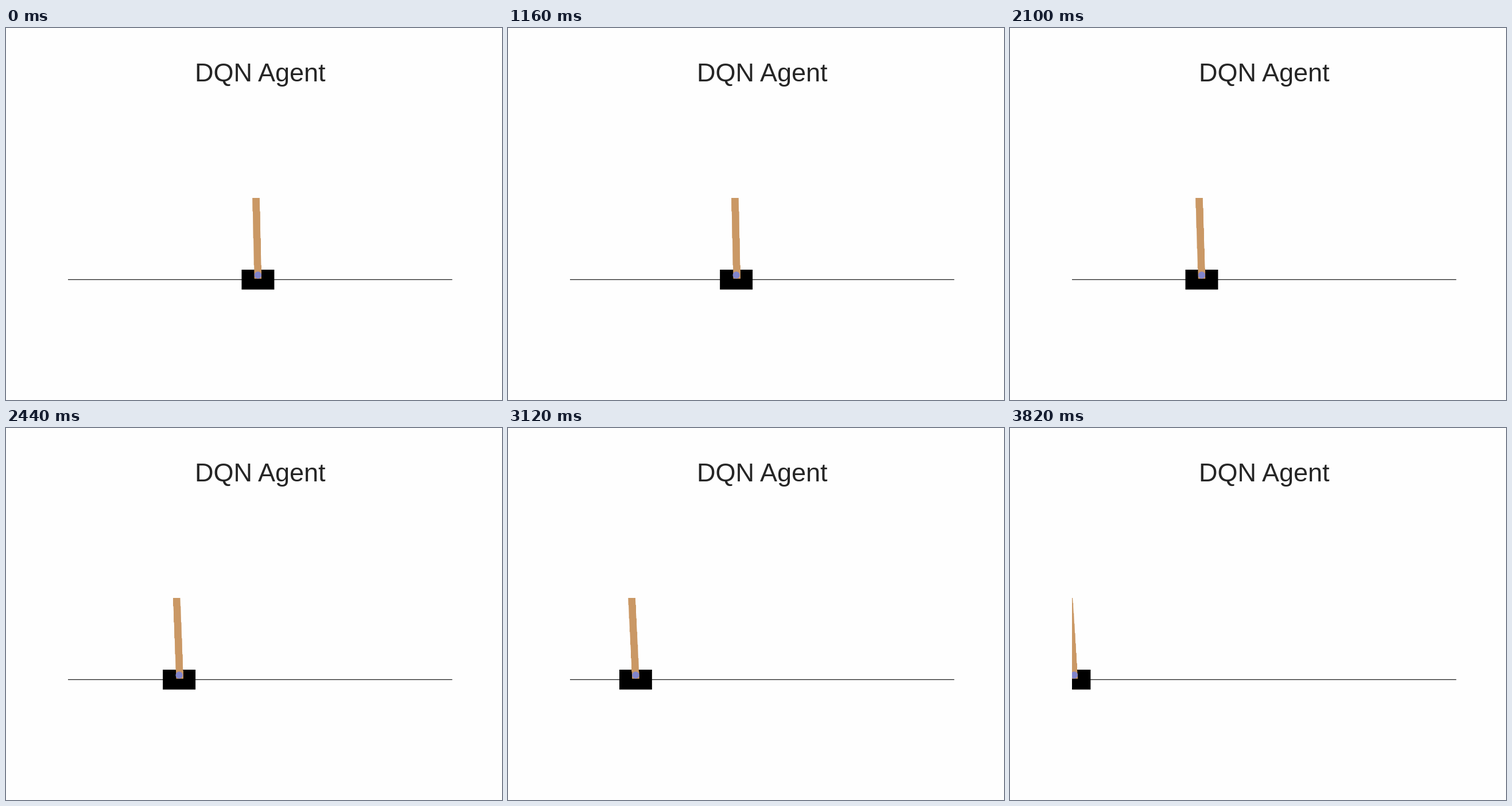
Animation, 864 px wide and 648 px high, one loop 3.84 s. Source, as an HTML page with a canvas:

```html
<!DOCTYPE html>
<html lang="en">
<head>
<meta charset="utf-8">
<title>Cart and pole</title>
<style>
  html, body { margin: 0; width: 100%; height: 100%; overflow: hidden; background: #fefefe; }
  canvas { display: block; }
</style>
</head>
<body>
<canvas id="stage" width="864" height="648"></canvas>
<script>
const ctx = document.getElementById('stage').getContext('2d');
const LOOP = 3840, STEP = 20;
const SCALE = 1.116, LEFT = 108, TOP = 104.04;   // plot area on the stage
const W = 600, H = 400, CART_Y = 100, PIVOT_Y = 107.5;
const POLE = 'rgb(202,152,101)', AXLE = 'rgb(129,132,203)';

// Leftward run of the cart: [ms, centre in plot pixels]
const run = [
  [0, 309], [560, 284.7], [1160, 259.95], [1640, 231.4],
  [2100, 202.3], [2760, 143.1], [3460, 59.4], [3820, 3.5]
];

// Smooth curve through unevenly spaced keys
function sample(keys, t) {
  const last = keys.length - 1;
  let i = 0;
  while (i < last - 1 && t >= keys[i + 1][0]) i++;
  const slope = k => {
    const a = keys[Math.max(k - 1, 0)], b = keys[Math.min(k + 1, last)];
    return (b[1] - a[1]) / (b[0] - a[0]);
  };
  const [t0, p0] = keys[i], [t1, p1] = keys[i + 1];
  const d = t1 - t0, u = (t - t0) / d, v = 1 - u;
  return v * v * (1 + 2 * u) * p0 + u * u * (3 - 2 * u) * p1
    + d * u * v * (v * slope(i) - u * slope(i + 1));
}

// The cart first drifts right, then joins the run
const cartX = t => sample(run, t) - 12.5 * Math.exp(-t / 114);

// Growing lean, a slow sway and a starting tilt, in radians
function poleAngle(t) {
  const s = t / 1000;
  return -0.0015 - 0.016 * s
    - 0.004 * Math.cos(2.62 * (s - 1.17))
    - 0.0285 * Math.exp(-((s / 0.22) ** 2));
}

const row = y => H - 1 - Math.floor(y);

function poleCorners(cx, angle) {
  const c = Math.cos(angle), s = Math.sin(angle);
  return [[-5, -5], [-5, 120], [5, 120], [5, -5]].map(([x, y]) =>
    [Math.floor(cx + x * c + y * s), row(PIVOT_Y - x * s + y * c)]);
}

// Leftmost and rightmost pixel edge of a polygon on one row
function span(points, y) {
  const xs = [];
  points.forEach(([ax, ay], i) => {
    const [bx, by] = points[(i + 1) % points.length];
    if (y < Math.min(ay, by) || y > Math.max(ay, by)) return;
    if (ay === by) xs.push(ax, bx);
    else xs.push(Math.round(ax + (bx - ax) * (y - ay) / (by - ay)));
  });
  return [Math.min(...xs), Math.max(...xs) + 1];
}

function trace(points) {
  ctx.beginPath();
  points.forEach(([x, y]) => ctx.lineTo(x, y));
  ctx.closePath();
}

// Stepped fill with a soft outline
function drawPole(corners) {
  const ys = corners.map(p => p[1]), left = [], right = [];
  for (let y = Math.min(...ys); y <= Math.max(...ys); y++) {
    const [a, b] = span(corners, y);
    left.push([a, y], [a, y + 1]);
    right.push([b, y], [b, y + 1]);
  }
  ctx.fillStyle = ctx.strokeStyle = POLE;
  trace([...left, ...right.reverse()]);
  ctx.fill();
  ctx.lineWidth = 1;
  trace(corners.map(([x, y]) => [x + 0.5, y + 0.5]));
  ctx.stroke();
}

function drawTitle() {
  ctx.fillStyle = '#262626';
  ctx.font = '45px "Liberation Sans", Arial, sans-serif';
  ctx.wordSpacing = '-2.5px';
  ctx.textAlign = 'center';
  ctx.fillText('DQN Agent', LEFT + W * SCALE / 2, 93);
}

function draw(t) {
  const cx = cartX(t), cell = Math.floor(cx);
  ctx.fillStyle = '#fefefe';
  ctx.fillRect(0, 0, 864, 648);
  drawTitle();

  ctx.save();
  ctx.setTransform(SCALE, 0, 0, SCALE, LEFT, TOP);
  ctx.beginPath();
  ctx.rect(0, 0, W, H);
  ctx.clip();

  ctx.fillStyle = '#000';
  ctx.fillRect(cell - 25, row(CART_Y + 15), 51, 31);
  drawPole(poleCorners(cx, poleAngle(t)));

  ctx.fillStyle = AXLE;
  ctx.beginPath();
  ctx.arc(cell + 0.5, row(PIVOT_Y) + 0.5, 5.5, 0, Math.PI * 2);
  ctx.fill();

  ctx.fillStyle = '#000';
  ctx.fillRect(0, row(CART_Y), W, 1);
  ctx.restore();
}

const start = performance.now();
function tick() {
  const t = Math.floor((performance.now() - start) % LOOP / STEP) * STEP;
  draw(t < 2 * STEP ? 0 : t);   // the first pose holds for two steps
  requestAnimationFrame(tick);
}
tick();
</script>
</body>
</html>
```
